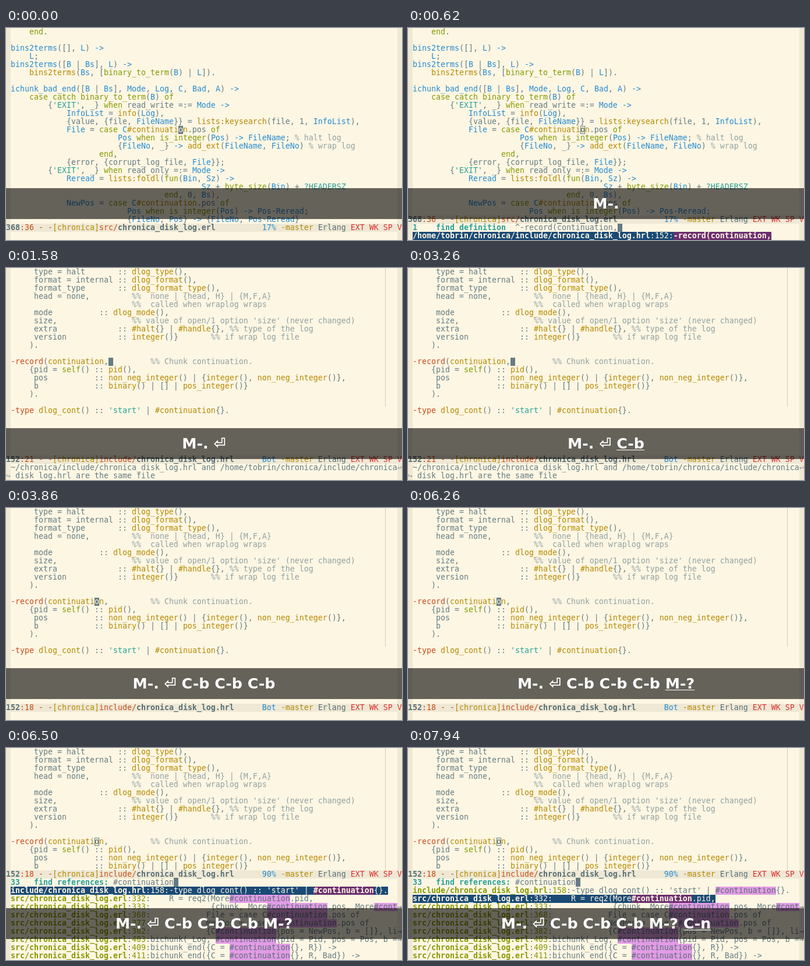
Write an HTML page that moves like this. It is 680x364 px and loops after 8 s.

```html
<!DOCTYPE html>
<html lang="en">
<head>
<meta charset="utf-8">
<title>Jump to definition</title>
<style>
  html, body { margin: 0; width: 100%; height: 100%; overflow: hidden; }
  #stage {
    position: relative; width: 680px; height: 364px; overflow: hidden; color: #657b83;
    background: linear-gradient(90deg, #eee8d5 8px, #fdf6e3 8px 672px, #eee8d5 672px);
    font: 13.29px/14px "DejaVu Sans Mono", monospace;
  }
  #stage div { position: absolute; white-space: pre; }
  .code { left: 8px; top: 0; overflow: hidden; }
  .ruler { left: 651px; top: 0; width: 1px; background: #d3cdba; }
  .cursor { width: 8px; height: 14px; background: #657b83; color: #fdf6e3; }
  .cursor.idle { background: none; color: inherit; box-shadow: inset 0 0 0 1px #657b83; }
  .mode { width: 680px; height: 14px; background: #eee8d5; color: #586e75; }
  .comment { color: #93a1a1; }
  .string, .macro, .prompt { color: #2aa198; }
  .directive { color: #cb4b16; }
  .keyword, .path { color: #859900; }
  .name { color: #268bd2; }
  .type { color: #b58900; }
  .minor { color: #dc322f; }
  .prompt, .path { font-weight: bold; }
  .hit { display: inline-block; height: 14px; vertical-align: top; background: #e39be6; color: #586e75; }
  .selected { height: 14px; background: #1a4a75; color: #fdf6e3; }
  .selected span { color: #fdf6e3; }
  .selected .hit { background: #6c2f6f; font-weight: bold; }
  #stage .keys {
    left: 0; top: 275px; width: 680px; height: 53px; text-align: center;
    background: rgba(0, 0, 0, .6); color: #fff;
    font: bold 25.3px/53px "DejaVu Sans", sans-serif;
  }
  u { text-decoration: underline 1px; text-underline-offset: 2px; text-decoration-skip-ink: none; }
</style>
</head>
<body>
<div id="stage"></div>
<script>
const ROW = 14, CELL = 8, FRINGE = 8, COLUMNS = 83, LOOP = 8000;

const erlCode = `    end.

bins2terms([], L) ->
    L;
bins2terms([B | Bs], L) ->
    bins2terms(Bs, [binary_to_term(B) | L]).

ichunk_bad_end([B | Bs], Mode, Log, C, Bad, A) ->
    case catch binary_to_term(B) of
        {'EXIT', _} when read_write =:= Mode ->
            InfoList = info(Log),
            {value, {file, FileName}} = lists:keysearch(file, 1, InfoList),
            File = case C#continuation.pos of
                       Pos when is_integer(Pos) -> FileName; % halt log
                       {FileNo, _} -> add_ext(FileName, FileNo) % wrap log
                   end,
            {error, {corrupt_log_file, File}};
        {'EXIT', _} when read_only =:= Mode ->
            Reread = lists:foldl(fun(Bin, Sz) ->
                                         Sz + byte_size(Bin) + ?HEADERSZ
                                 end, 0, Bs),
            NewPos = case C#continuation.pos of
                         Pos when is_integer(Pos) -> Pos-Reread;
                         {FileNo, Pos} -> {FileNo, Pos-Reread}`;

const hrlCode = `     type = halt       :: dlog_type(),
     format = internal :: dlog_format(),
     format_type       :: dlog_format_type(),
     head = none,         %%  none | {head, H} | {M,F,A}
                          %%  called when wraplog wraps
     mode          :: dlog_mode(),
     size,                %% value of open/1 option 'size' (never changed)
     extra             :: #halt{} | #handle{}, %% type of the log
     version           :: integer()}       %% if wrap log file
    ).

-record(continuation,         %% Chunk continuation.
    {pid = self() :: pid(),
     pos          :: non_neg_integer() | {integer(), non_neg_integer()},
     b            :: binary() | [] | pos_integer()}
    ).

-type dlog_cont() :: 'start' | #continuation{}.`;

const definitions = [
  "/home/tobrin/chronica/include/chronica_disk_log.hrl:152:-record(continuation,"
];
const references = [
  "include/chronica_disk_log.hrl:158:-type dlog_cont() :: 'start' | #continuation{}.",
  ...[
    "332:    R = req2(More#continuation.pid,",
    "333:             {chunk, More#continuation.pos, More#continuation.b",
    "368:            File = case C#continuation.pos of",
    "377:            NewPos = case C#continuation.pos of",
    "382:            {C#continuation{pos = NewPos, b = []}, lists",
    "403:bichunk(_Log, #continuation{pid = Pid, pos = Pos, b = B",
    "409:bichunk_end({C = #continuation{}, R}) ->",
    "411:bichunk_end({C = #continuation{}, R, Bad}) ->"
  ].map(line => "src/chronica_disk_log.erl:" + line)
];

const syntax = {
  comment: /%.*/,
  string: /'[^']*'/,
  macro: /\?\w+/,
  directive: /^-\w+/,
  keyword: /\b(?:case|catch|of|when|end|fun)\b|\b(?:binary_to_term|is_integer|byte_size|self)(?=\()/,
  name: /^[a-z]\w*(?=\()|->|\b[A-Z]\w*/,
  type: /(?<=record\()\w+|#\w+|\b(?:\w+:)?[a-z]\w*(?=\()/
};
const token = new RegExp(
  Object.entries(syntax).map(([cls, re]) => `(?<${cls}>${re.source})`).join("|"), "gm");

const span = (cls, text) => `<span class="${cls}">${text}</span>`;
const highlight = code => code.replace(token, (text, ...rest) => {
  const groups = rest.at(-1);
  return span(Object.keys(groups).find(cls => groups[cls]), text);
});
const put = (row, html, cls = "", x = FRINGE) =>
  `<div class="${cls}" style="left:${x}px;top:${row * ROW}px">${html}</div>`;
const cursor = (row, col, char = " ", idle = false) =>
  put(row, char, idle ? "cursor idle" : "cursor", FRINGE + col * CELL);
const codeWindow = (code, rows) =>
  `<div class="code" style="height:${rows * ROW}px">${highlight(code)}</div>`;

function modeLine(row, line, col, folder, file, place) {
  const gap = 55 - `${line}:${col} - -[chronica]${folder}${file}`.length;
  return put(row, `<b>${line}</b>` + span("directive", `:${col} - -`) + span("type", "[chronica]") +
    span("directive", folder) + `<b>${file}</b>` + " ".repeat(gap) + span("name", place) + " " +
    span("type", "-master") + " Erlang " + span("minor", "EXT WK SP V"), "mode", 0);
}

function picker(row, prompt, query, lines, hit, selected) {
  const head = prompt.padEnd(22);
  const items = lines.map((line, i) => {
    const [, path, number, text] = line.slice(0, COLUMNS).match(/^(.*?):(\d+):(.*)$/);
    const html = span("path", path) + ":" + span("keyword", number) + ":" +
      text.replace(hit, match => span("hit", match));
    return put(row + 1 + i, html, i === selected ? "selected" : "") +
      (line.length > COLUMNS ? put(row + 1 + i, "→", "", 672) : "");
  });
  return put(row, span("prompt", head) + query) + cursor(row, head.length + query.length) + items.join("");
}

const erlView = rows => codeWindow(erlCode, rows) +
  cursor(12, 36, "o", rows < 24) +
  modeLine(rows, 368, 36, "src/", "chronica_disk_log.erl", "17%");

const hrlView = (rows, col, place = "Bot") => codeWindow(hrlCode, rows) +
  `<div class="ruler" style="height:${Math.min(rows, 17) * ROW}px"></div>` +
  cursor(11, col, "-record(continuation,"[col], rows < 23) +
  modeLine(rows, 152, col, "include/", "chronica_disk_log.hrl", place);

const views = {
  source: () => erlView(24),
  definition: () => erlView(23) +
    picker(24, "1    find definition", "^-record(continuation,", definitions, /-record.*/, 0),
  visited: () => hrlView(23, 21) +
    put(24, "~/chronica/include/chronica_disk_log.hrl and /home/tobrin/chronica/include/chronica") +
    put(25, "_disk_log.hrl are the same file") +
    put(24, "↩", "comment", 672) + put(25, "↪", "comment", 0),
  record: col => hrlView(24, col),
  references: selected => hrlView(15, 18, "90%") +
    picker(16, "33   find references:", "#continuation", references, /#cont\w*/g, selected)
};

const pressed = "M-. ⏎ C-b C-b C-b M-? C-n".split(" ");

// start time, keys shown, newest key underlined, view, view argument
const steps = [
  [0, 0, false, "source"],
  [500, 1, true, "source"],
  [620, 1, false, "definition"],
  [1340, 2, true, "visited"],
  [1580, 2, false, "visited"],
  [3260, 3, true, "visited"],
  [3380, 3, true, "record", 20],
  [3620, 4, true, "record", 19],
  [3740, 5, true, "record", 18],
  [3860, 5, false, "record", 18],
  [6260, 6, true, "record", 18],
  [6380, 6, true, "references", 0],
  [6500, 6, false, "references", 0],
  [7940, 7, true, "references", 1]
];

const stage = document.getElementById("stage");
let shown;

function draw() {
  const time = performance.now() % LOOP;
  const step = steps.findLast(([start]) => start <= time);
  if (step !== shown) {
    shown = step;
    const [, count, fresh, view, arg] = step;
    const keys = pressed.slice(0, count);
    if (fresh) keys.push(`<u>${keys.pop()}</u>`);
    stage.innerHTML = views[view](arg) + `<div class="keys">${keys.join(" ")}</div>`;
  }
  requestAnimationFrame(draw);
}
draw();
</script>
</body>
</html>
```
